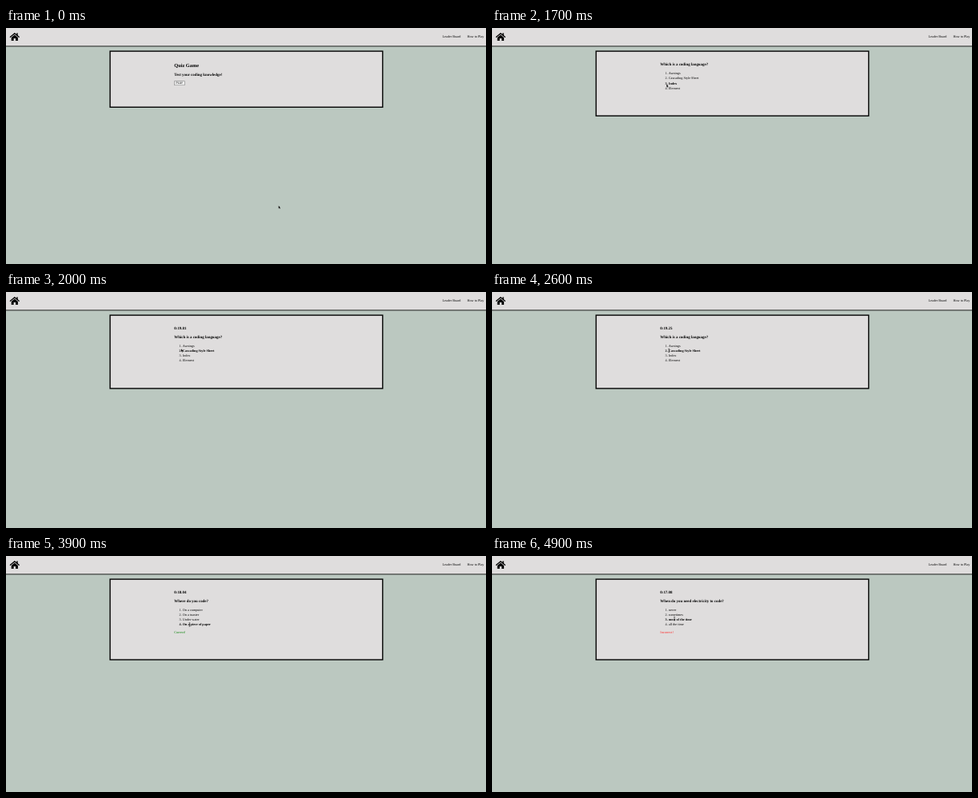
Animation of 600x296 px, one loop 5 s. Source, as an HTML page with a canvas:

```html
<!DOCTYPE html>
<html lang="en">
<head>
<meta charset="utf-8">
<title>Quiz Game</title>
<style>
  html, body { margin: 0; width: 100%; height: 100%; overflow: hidden; background: #bbc8c0; }
  canvas { display: block; width: 600px; height: 296px; }
</style>
</head>
<body>
<canvas id="stage" width="600" height="296"></canvas>
<script>
const ctx = document.getElementById('stage').getContext('2d');
const LOOP = 5000, STEP = 100;
const ZOOM = 0.263;          // page zoom: 16px text is about 4.2px
const LEFT = 210.3, ROW = 6.31;
const SERIF = '"Liberation Serif", "Times New Roman", serif';
const SANS = '"Liberation Sans", Arial, sans-serif';
const PANEL = '#dfdddd';

const questions = [
  ['Which is a coding language?', 'Awnings', 'Cascading Style Sheet', 'Index', 'Element'],
  ['Where do you code?', 'On a computer', 'On a toaster', 'Under water', 'On a piece of paper'],
  ['When do you need electricity to code?', 'never', 'sometimes', 'most of the time', 'all the time']
];

// [time, x, y] of the pointer's hot spot
const path = [
  [0, 340.7, 222.8], [99, 340.7, 222.8], [100, 310.5, 147.3], [399, 310.5, 147.3],
  [400, 274.6, 105.3], [599, 274.6, 105.3], [600, 252, 91], [700, 234, 80],
  [800, 225, 74.5], [900, 220, 71.3], [1000, 218.2, 70.4], [1900, 218.2, 70.6],
  [2200, 220.6, 72.8], [2800, 221.4, 73.6], [3200, 226.3, 74.5], [3400, 226.8, 75.2],
  [3900, 229.4, 86], [4600, 229.4, 86], [4800, 228, 79], [5000, 228, 78.5]
];
// [time, seconds left]
const clock = [[1800, 20], [2600, 19.25], [3200, 18.69], [4400, 17.58], [4900, 17.08]];

function sample(keys, t) {
  let i = 1;
  while (i < keys.length - 1 && keys[i][0] < t) i++;
  const a = keys[i - 1], b = keys[i];
  const k = Math.min(1, Math.max(0, (t - a[0]) / (b[0] - a[0])));
  return a.slice(1).map((v, j) => v + (b[j + 1] - v) * k);
}

function rect(x, y, w, h, color) {
  ctx.fillStyle = color;
  ctx.fillRect(x, y, w, h);
}

function shape(points, color) {
  ctx.beginPath();
  points.forEach(([x, y]) => ctx.lineTo(x, y));
  ctx.closePath();
  ctx.fillStyle = color;
  ctx.fill();
}

function text(str, x, y, { size = 16, bold = false, color = '#000', family = SERIF } = {}) {
  ctx.save();
  ctx.translate(x, y);
  ctx.scale(ZOOM, ZOOM);
  ctx.font = `${bold ? 'bold ' : ''}${size}px ${family}`;
  ctx.textRendering = 'geometricPrecision';
  ctx.fillStyle = color;
  ctx.fillText(str, 0, 0);
  ctx.restore();
}

const heading = (str, y, size = 18.72) => text(str, LEFT, y, { size, bold: true });

function homeIcon() {
  ctx.strokeStyle = '#000';
  ctx.lineWidth = 1.3;
  ctx.lineJoin = ctx.lineCap = 'round';
  ctx.beginPath();
  ctx.moveTo(5.4, 11.3);
  ctx.lineTo(10.8, 6.7);
  ctx.lineTo(16.2, 11.3);
  ctx.stroke();
  rect(13.2, 6.4, 1.5, 3.2, '#000');
  shape([[10.8, 8.5], [14.9, 12], [14.9, 16], [12, 16], [12, 12.9],
         [9.6, 12.9], [9.6, 16], [6.7, 16], [6.7, 12]], '#000');
}

function page(bottom) {
  rect(0, 0, 600, 296, '#bbc8c0');
  rect(0, 0, 600, 22.5, PANEL);
  rect(0, 22.4, 600, 1, '#222');
  homeIcon();
  text('Leader Board', 545.4, 11.6);
  text('How to Play', 576.4, 11.6);
  rect(129.4, 28.4, 342.1, bottom - 28.4, '#000');
  rect(130.8, 29.8, 339.3, bottom - 31.2, PANEL);
}

function startScreen(hover) {
  page(100);
  heading('Quiz Game', 48.8, 24);
  heading('Test your coding knowledge!', 60);
  rect(210.3, 66.3, 13.2, 5.7, hover ? '#444' : '#767676');
  rect(210.8, 66.8, 12.2, 4.7, hover ? '#e2e2e2' : '#efefef');
  text('PLAY', 212.4, 70.4, { size: 13.33, family: SANS });
}

function quizScreen(t, pointerY) {
  const timed = t >= 1900;
  const [question, ...answers] = questions[t < 3000 ? 0 : t < 4500 ? 1 : 2];
  const right = t >= 3000 && t < 4100, wrong = t >= 4500;
  const shift = timed ? 10.6 : 0;
  page(right || wrong ? 130.8 : timed ? 121.7 : 110.9);
  if (timed) heading('0:' + sample(clock, t)[0].toFixed(2), 47.1);
  heading(question, 47.1 + shift);
  const hover = Math.floor((pointerY - 53.4 - shift) / ROW);
  answers.forEach((answer, i) => {
    const y = 57.9 + shift + i * ROW, bold = i === hover;
    text(`${i + 1}.`, 216.6, y, { bold });
    text(answer, 220.8, y, { bold });
  });
  if (right) text('Correct!', LEFT, 97.4, { color: '#008000' });
  if (wrong) text('Incorrect!', LEFT, 97.4, { color: '#ff2a2a' });
}

function arrow(x, y) {
  ctx.save();
  ctx.translate(x, y);
  const outline = [[0, 0], [0, 3.6], [0.8, 2.9], [1.4, 4.3], [2, 4], [1.4, 2.7], [2.5, 2.6]];
  shape(outline, '#000');
  ctx.strokeStyle = 'rgba(255,255,255,.35)';
  ctx.lineWidth = 0.3;
  ctx.stroke();
  ctx.restore();
}

function beam(x, y) {
  rect(x - 0.3, y - 2.2, 0.6, 4.4, '#222');
  rect(x - 0.9, y - 2.4, 1.8, 0.5, '#222');
  rect(x - 0.9, y + 1.9, 1.8, 0.5, '#222');
}

function draw(now) {
  const t = Math.floor(now % LOOP / STEP) * STEP;
  const [x, y] = sample(path, t);
  if (t < 1700) startScreen(t >= 900);
  else quizScreen(t, y);
  if (t < 2200) arrow(x, y);
  else beam(x, y);
}

const start = performance.now();
function tick() {
  draw(performance.now() - start);
  requestAnimationFrame(tick);
}
tick();
</script>
</body>
</html>
```
